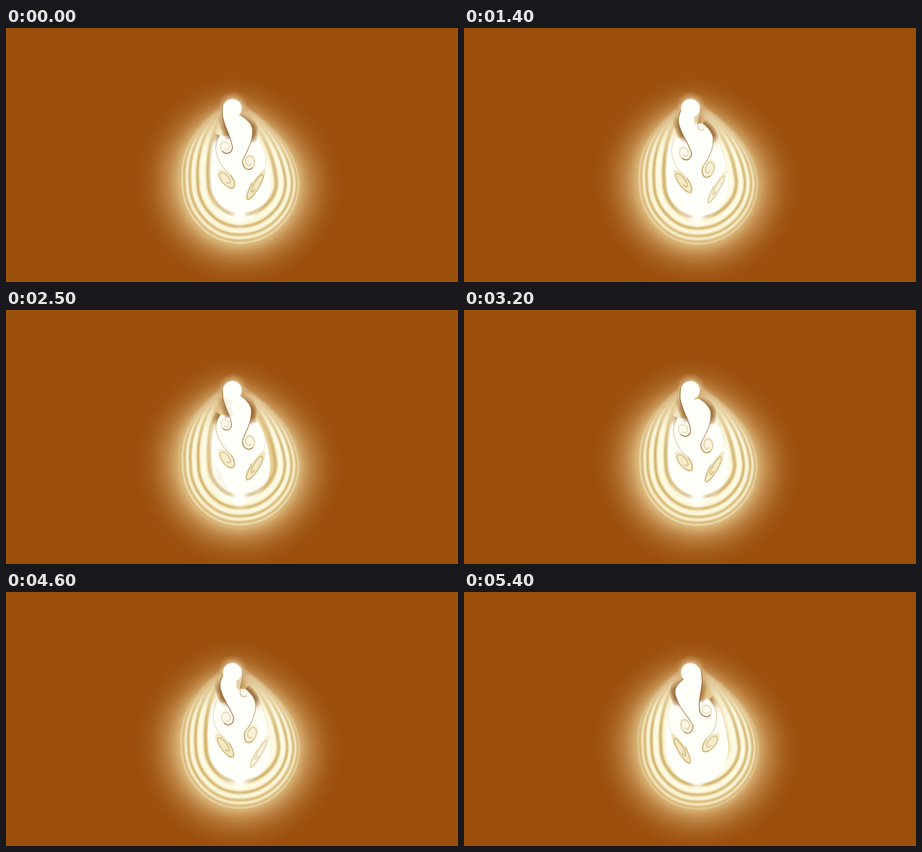
Animation, 600 px wide and 338 px high, one loop 5500 ms. Source, as an HTML page with a canvas:

```html
<!DOCTYPE html>
<html lang="en">
<head>
<meta charset="utf-8">
<title>Flame</title>
<style>
html, body { margin: 0; width: 100%; height: 100%; overflow: hidden; background: #9c4e0b; }
canvas { display: block; width: 600px; height: 338px; }
</style>
</head>
<body>
<canvas id="stage" width="600" height="338"></canvas>
<script>
const LOOP = 5500, STEP = 100, PERIOD = 636;
const ctx = document.getElementById('stage').getContext('2d');

// Vortex stages at ages -0.5, 0, 0.5 ... 2, measured from the flame axis:
// four edge points (d, y), then centre d, y, half width, half length, tilt.
const STAGES = [
  [11, 98, 12, 102, 11, 107, 9, 111, 10, 114, 2, 2, 0],
  [13, 101, 15.5, 114, 12, 131, 7, 147, 15, 158, 9, 10, 0],
  [10, 116, 25, 126, 22, 148, 11, 167, 14, 178, 9, 12, .2],
  [21, 143, 29, 155, 28, 172, 22, 186, 18, 201, 8, 17, .7],
  [31, 150, 37, 165, 37, 180, 33, 191, 22, 209, 6, 25, .53],
  [37, 165, 40, 178, 41, 188, 39, 196, 33, 216, 3, 30, .5]
];

const clamp = v => Math.max(0, Math.min(1, v));
const mix = (a, b, t) => a + (b - a) * t;
const frac = v => v - Math.floor(v);
const axis = y => {
  const t = clamp((y - 100) / 100);
  return 301 + 9 * t * t * (3 - 2 * t);
};
const ringWidth = u => 92 - 51 * Math.exp(-.33 * (u - 2));
const ringBottom = u => 303 - 59 * Math.exp(-.33 * (u - 2));

// Vertical gradient from [y, alpha] stops of one colour
function fade(c, rgb, ...stops) {
  const g = c.createLinearGradient(0, 0, 0, 338);
  for (const [y, a] of stops) g.addColorStop(y / 338, `rgba(${rgb},${a})`);
  return g;
}

function drop(left, right, bottom) {
  const path = new Path2D();
  const at = (d, y) => [axis(y) + d, y];
  const low = mix(205, bottom, .55);
  path.moveTo(...at(-6, 99));
  path.bezierCurveTo(...at(-left * .42, 113), ...at(-left, 152), ...at(-left, 205));
  path.bezierCurveTo(...at(-left, low), ...at(-left * .55, bottom), ...at(0, bottom));
  path.bezierCurveTo(...at(right * .55, bottom), ...at(right, low), ...at(right, 205));
  path.bezierCurveTo(...at(right, 152), ...at(right * .42, 113), ...at(6, 99));
  return path;
}

function soft(path, width, style, alpha) {
  ctx.strokeStyle = style;
  for (const k of [1.35, .9, .45]) {
    ctx.globalAlpha = alpha * .55;
    ctx.lineWidth = width * k;
    ctx.stroke(path);
  }
  ctx.globalAlpha = 1;
}

function glow(x, y, rx, ry, rgb, core, alpha) {
  const g = ctx.createRadialGradient(0, 0, 0, 0, 0, 1);
  g.addColorStop(0, `rgba(${rgb},${alpha})`);
  g.addColorStop(core, `rgba(${rgb},${alpha})`);
  g.addColorStop(mix(core, 1, .5), `rgba(${rgb},${alpha * .35})`);
  g.addColorStop(1, `rgba(${rgb},0)`);
  ctx.save();
  ctx.translate(x, y);
  ctx.scale(rx, ry);
  ctx.fillStyle = g;
  ctx.fillRect(-1, -1, 2, 2);
  ctx.restore();
}

function curve(pts, path = new Path2D()) {
  path.moveTo(...pts[0]);
  for (let i = 1; i < pts.length - 1; i++) {
    const [x, y] = pts[i], [nx, ny] = pts[i + 1];
    path.quadraticCurveTo(x, y, (x + nx) / 2, (y + ny) / 2);
  }
  path.lineTo(...pts[pts.length - 1]);
  return path;
}

const backdrop = (() => {
  const layer = document.createElement('canvas');
  layer.width = 600;
  layer.height = 338;
  const c = layer.getContext('2d');
  c.fillStyle = '#9c4e0b';
  c.fillRect(0, 0, 600, 338);
  c.filter = 'blur(22px)';
  c.fillStyle = fade(c, '226,192,132', [95, .8], [160, 1]);
  c.fill(drop(96, 96, 303));
  c.filter = 'blur(9px)';
  c.fillStyle = fade(c, '232,208,148', [95, .3], [125, .5], [165, 1]);
  c.fill(drop(77, 77, 288));
  return layer;
})();

const bright = fade(ctx, '255,255,234', [108, .05], [130, .3], [170, 1]);
const gap = fade(ctx, '204,170,98', [112, 0], [135, .35], [180, 1], [235, 1], [262, .7]);
const white = fade(ctx, '255,255,250', [138, 0], [164, 1]);
const shade = fade(ctx, '132,74,20', [114, 0], [131, .75], [142, .8], [154, 0]);

function stage(u) {
  const f = Math.min(4.999, (u + .5) * 2), i = Math.floor(f);
  return STAGES[i].map((v, k) => mix(v, STAGES[i + 1][k], f - i));
}

function vortex(u, side) {
  if (u < -.5) return;
  const s = stage(u);
  const [cd, cy, w, l, tilt] = s.slice(8);
  const at = (d, y) => [axis(y) + side * d, y];
  const edge = [0, 2, 4, 6].map(i => at(s[i], s[i + 1]));
  const spin = (phi, r) => {
    const e = -w * r * Math.cos(phi), f = l * r * Math.sin(phi);
    return at(cd + e * Math.cos(tilt) - f * Math.sin(tilt),
              cy + e * Math.sin(tilt) + f * Math.cos(tilt));
  };
  const coil = [], rim = [];
  for (let i = 0; i <= 34; i++) {
    coil.push(spin(i / 34 * Math.PI * 2.8, mix(1, .35, i / 34)));
    rim.push(spin(i / 34 * Math.PI * 2, .95));
  }

  if (u < 1.2) soft(curve(edge), 10, shade, .85 * clamp((1.2 - u) * 3) * clamp(u + .7));

  const alpha = u < 0 ? (u + .5) * 2 : clamp((2 - u) / .5);
  const body = curve([...edge, coil[0]]);
  body.lineTo(...at(-3, coil[0][1]));
  body.lineTo(...at(-3, edge[0][1] + 3));
  ctx.globalAlpha = alpha;
  ctx.fillStyle = '#fffffa';
  ctx.fill(body);

  const t = clamp(u / 1.4);
  ctx.globalAlpha = alpha * mix(.2, .8, clamp(u - .2));
  ctx.fillStyle = '#f0e4b8';
  ctx.fill(curve(rim));

  ctx.strokeStyle = '#d0b87c';
  ctx.globalAlpha = alpha * mix(.5, .85, t);
  ctx.lineWidth = mix(1.2, 1.8, t);
  ctx.stroke(curve(coil));

  const tone = [mix(142, 200, t), mix(92, 168, t), mix(36, 100, t)].map(Math.round);
  ctx.strokeStyle = `rgb(${tone})`;
  ctx.globalAlpha = alpha * mix(.85, .25, clamp(u - .4));
  ctx.lineWidth = 1.1;
  ctx.stroke(curve([...edge, ...coil.slice(0, 10)]));
  ctx.globalAlpha = 1;
}

function draw(time) {
  const left = frac(time / PERIOD), right = frac(left + .5);
  ctx.drawImage(backdrop, 0, 0);

  const ring = u => drop(ringWidth(u), ringWidth(u + .5), ringBottom(u + .25));
  for (let k = 6; k >= 1; k--) {
    const u = k + left + .5;
    const width = (ringWidth(u + .5) - ringWidth(u - .5)) * .58;
    soft(ring(u), width, bright, clamp((6.6 - u) / 3.6));
  }
  ctx.fillStyle = white;
  ctx.fill(drop(41, 41, 256));
  for (let k = 1; k <= 6; k++) {
    const u = k + left;
    const width = mix(5, 3.4, clamp(u - 1.8));
    soft(ring(u), width, gap, .6 * clamp((u - 1.5) * 2.5) * clamp((6.8 - u) / 3.5));
  }
  glow(310, 246, 14, 22, '255,255,250', .4, .95);

  for (const k of [1, 0, -1]) {
    vortex(left + k, -1);
    vortex(right + k, 1);
  }

  glow(301, 101, 19, 17, '255,250,215', .3, .6);
  ctx.fillStyle = '#fffffa';
  ctx.beginPath();
  ctx.ellipse(300.5, 107, 12.5, 12.5, 0, 0, Math.PI * 2);
  ctx.fill();
}

let shown = -1;
function tick() {
  const step = Math.floor(performance.now() % LOOP / STEP);
  if (step !== shown) {
    shown = step;
    draw(step * STEP);
  }
  requestAnimationFrame(tick);
}
tick();
</script>
</body>
</html>
```
